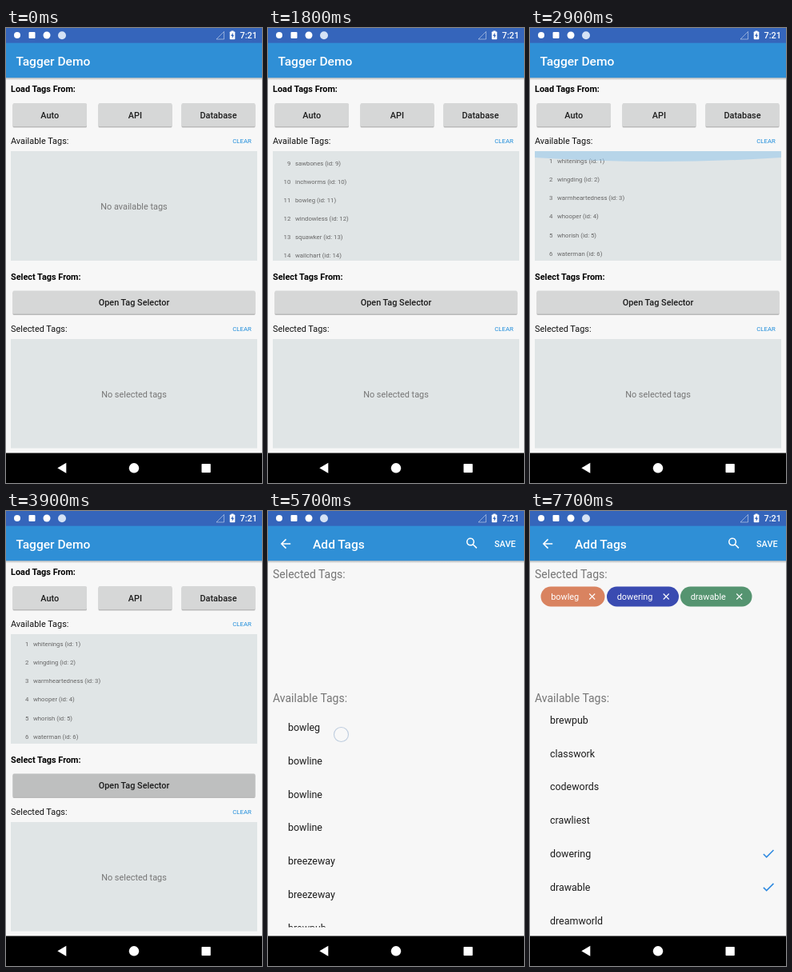
These frames come from a looping animation (320 px wide and 569 px high, 8 s). An HTML page:

```html
<!DOCTYPE html>
<html lang="en">
<head>
<meta charset="utf-8">
<title>Tagger Demo</title>
<style>
html, body { margin: 0; width: 100%; height: 100%; overflow: hidden; background: #000; }
svg { display: block; width: 100%; height: 100%; font-family: Roboto, sans-serif; }
</style>
</head>
<body>
<svg viewBox="0 0 320 569">
  <defs>
    <clipPath id="panel"><rect x="6" y="154" width="308" height="137"/></clipPath>
    <clipPath id="rows"><rect y="246" width="320" height="274.5"/></clipPath>
    <linearGradient id="shade" x2="0" y2="1">
      <stop stop-opacity=".25"/><stop offset="1" stop-opacity="0"/>
    </linearGradient>
  </defs>
  <g id="stage"></g>
</svg>
<script>
const LOOP = 8000, STEP = 100;
const BLUE = '#2f8fd6', GREY = '#757575', INK = '#1c1c1c';
const loaded = ['whitenings', 'wingding', 'warmheartedness', 'whooper', 'whorish', 'waterman',
  'windowsill', 'wheelbase', 'sawbones', 'inchworms', 'bowleg', 'windowless', 'squawker',
  'wallchart', 'bowline', 'breezeway'];
const sorted = ['bowleg', 'bowline', 'bowline', 'bowline', 'breezeway', 'breezeway', 'brewpub',
  'classwork', 'codewords', 'crawliest', 'dowering', 'drawable', 'dreamworld'];
const chips = [
  { tag: 'bowleg', at: 5900, x: 13.5, w: 80, color: '#d98360' },
  { tag: 'dowering', at: 7200, x: 96, w: 90, color: '#3a4bb1' },
  { tag: 'drawable', at: 7700, x: 188, w: 89.5, color: '#559470' }
];

const progress = (t, from, to) => Math.min(1, Math.max(0, (t - from) / (to - from)));
const smooth = p => p * p * (3 - 2 * p);
const pulse = (t, from, to) => Math.sin(Math.PI * progress(t, from, to));
const during = (t, from, to) => t >= from && t < to;

const rect = (x, y, w, h, fill, extra = '') =>
  `<rect x="${x}" y="${y}" width="${w}" height="${h}" fill="${fill}" ${extra}/>`;
const circle = (x, y, r, fill, extra = '') =>
  `<circle cx="${x}" cy="${y}" r="${r}" fill="${fill}" ${extra}/>`;
// y is the middle of the capital letters
const text = (x, y, size, fill, label, weight = 400, anchor = 'start') =>
  `<text x="${x}" y="${y + size * .36}" font-size="${size}" fill="${fill}" font-weight="${weight}" text-anchor="${anchor}">${label}</text>`;
// icons use a 24-unit grid centred on x, y
const icon = (x, y, path, color) =>
  `<path transform="translate(${x} ${y}) scale(.777) translate(-12 -12)" d="${path}" fill="none" stroke="${color}" stroke-width="2"/>`;
const check = y => icon(298, y, 'M4.1 12.7 9 17.6 20.3 6.3', '#2f8ae0');
const touch = (x, y) => circle(x, y, 9, '#fff', 'fill-opacity=".2" stroke="#a9bdd6" stroke-opacity=".75" stroke-width="1.1"');

function button(x, y, w, label, press = 0) {
  return rect(x, y + 1.2, w, 29.3, '#aaa', 'rx="1.6" opacity=".8"') +
    rect(x, y, w, 29, '#d6d7d7', 'rx="1.6"') +
    rect(x, y, w, 29, '#000', `rx="1.6" opacity="${.13 * press}"`) +
    text(x + w / 2, y + 15, 10.9, INK, label, 500, 'middle');
}

function frameOf(title, titleX, body) {
  return rect(0, 0, 320, 569, '#f7f7f7') + body +
    rect(0, 62, 320, 3.5, 'url(#shade)') +
    rect(0, 0, 320, 19, '#3565bb') + rect(0, 18.7, 320, 43.5, BLUE) +
    text(titleX, 41, 15.55, '#fff', title, 500) + rect(0, 531.5, 320, 38, '#000');
}

function homeScreen(t) {
  const scroll = 212 * (1 - (1 - progress(t, 1300, 2100)) ** 2) - 212 * smooth(progress(t, 2300, 2800));
  const glow = pulse(t, 2700, 3100);
  const items = loaded.map((tag, i) => {
    const y = 166.5 + i * 23.05 - scroll;
    return text(28.3, y, 7.78, '#666', i + 1, 400, 'end') +
      text(34, y, 7.78, '#666', `${tag} (id: ${i + 1})`);
  }).join('');
  const heading = (y, label) => text(6, y, 10.9, '#111', label) +
    text(295, y, 7.78, '#1f8ddb', 'CLEAR', 400, 'middle');

  let body = text(6, 76, 10.9, '#000', 'Load Tags From:', 700) +
    button(8.5, 94, 92.5, 'Auto', pulse(t, 400, 1300)) +
    button(115.5, 94, 92, 'API') + button(219.5, 94, 92, 'Database') +
    heading(141, 'Available Tags:') + rect(6, 154, 308, 137, '#e0e5e6') +
    text(6, 311, 10.9, '#000', 'Select Tags From:', 700) +
    button(8.5, 328.5, 303, 'Open Tag Selector', pulse(t, 3600, 4500)) +
    heading(376, 'Selected Tags:') + rect(6, 389, 308, 136.5, '#e0e5e6') +
    text(160, 458, 10.9, GREY, 'No selected tags', 400, 'middle');
  body += t < 800
    ? text(160, 223, 10.9, GREY, 'No available tags', 400, 'middle')
    : `<g clip-path="url(#panel)"><g opacity="${progress(t, 700, 900)}">${items}</g>
       <path d="M6 154V${154 + 8 * glow}Q160 ${154 + 18 * glow} 314 ${154 + 8 * glow}V154Z" fill="#8fc6ee" opacity="${.5 * glow}"/></g>`;
  if (during(t, 500, 700)) body += touch(58, 112);
  if (during(t, 1400, 1600)) body += touch(165, 290 - scroll);
  if (during(t, 2400, 2700)) body += touch(165, 385 - scroll);
  if (during(t, 3700, 3900)) body += touch(163, 347);
  return frameOf('Tagger Demo', 12.5, body);
}

function selectorScreen(t) {
  const scroll = 262 * smooth(progress(t, 6200, 6500)) - 2 * progress(t, 6500, 6700);
  const picked = chips.filter(chip => t >= chip.at);
  const items = sorted.map((tag, i) => {
    const y = 270.5 + i * 41.8 - scroll;
    return text(25, y, 12.44, INK, tag) + (picked.some(chip => chip.tag === tag) ? check(y) : '');
  }).join('');

  let body = text(6, 78.5, 14, GREY, 'Selected Tags:') + text(6, 234, 14, GREY, 'Available Tags:') +
    `<g clip-path="url(#rows)">${items}</g>`;
  for (const { tag, x, w, color } of picked) {
    body += rect(x, 94.5, w, 25, color, 'rx="12.5"') + text(x + 12.7, 107.3, 10.9, '#fff', tag) +
      `<path d="M${x + w - 19.3} 103.5l7 7m0-7l-7 7" stroke="#fff" stroke-width="1.1"/>`;
  }
  if (during(t, 5700, 5900)) body += touch(91.5, 279.5);
  if (during(t, 6200, 6700)) body += touch(163, 437 - scroll);
  if (during(t, 7000, 7200)) body += touch(98.5, 423);
  if (during(t, 7500, 7700)) body += touch(113.5, 473);
  return frameOf('Add Tags', 56, body) +
    icon(22, 41, 'M20 12H5M12.7 4.7 5.4 12l7.3 7.3', '#fff') +
    icon(255, 40.5, 'M4 9.5a5.5 5.5 0 1 0 11 0a5.5 5.5 0 1 0-11 0M13.6 13.6l6 6', '#fff') +
    text(283, 41, 10.9, '#fff', 'SAVE', 500);
}

const systemIcons = circle(14, 9, 4, '#fff') + rect(28.5, 5, 8, 8, '#fff', 'rx="1"') +
  circle(51, 9, 4.5, '#fff') + circle(70, 9.3, 5, '#d5e2f5') +
  '<path d="M272.5 4.5V14H263Z" fill="none" stroke="#fff" stroke-opacity=".45"/>' +
  rect(281.5, 3.5, 3, 2, '#fff') + rect(279.7, 4.5, 6.6, 9.8, '#fff', 'rx=".8"') +
  '<path d="M283.6 5.8l-2.5 4.2h1.6v3l2.4-4.3h-1.5Z" fill="#3565bb"/>' +
  text(314, 9.5, 10.9, '#fff', '7:21', 500, 'end') +
  '<path d="M64.3 550.3 75.3 543.8V556.8Z" fill="#fff"/>' +
  circle(160, 550.3, 6.2, '#fff') + rect(244.5, 545, 11.3, 11, '#fff', 'rx=".8"');

function scene(t) {
  const slide = 45.5 * (1 - progress(t, 4231, 4581)) ** 5;
  const opacity = 1 - (1 - progress(t, 4231, 4431)) ** 4;
  return (t < 4600 ? homeScreen(t) : '') +
    (t > 4231 ? `<g transform="translate(0 ${slide})" opacity="${opacity}">${selectorScreen(t)}</g>` : '') +
    systemIcons;
}

const stage = document.getElementById('stage');
let shown = -1;
function tick() {
  const t = Math.floor(performance.now() % LOOP / STEP) * STEP;
  if (t !== shown) stage.innerHTML = scene(shown = t);
  requestAnimationFrame(tick);
}
tick();
</script>
</body>
</html>
```
